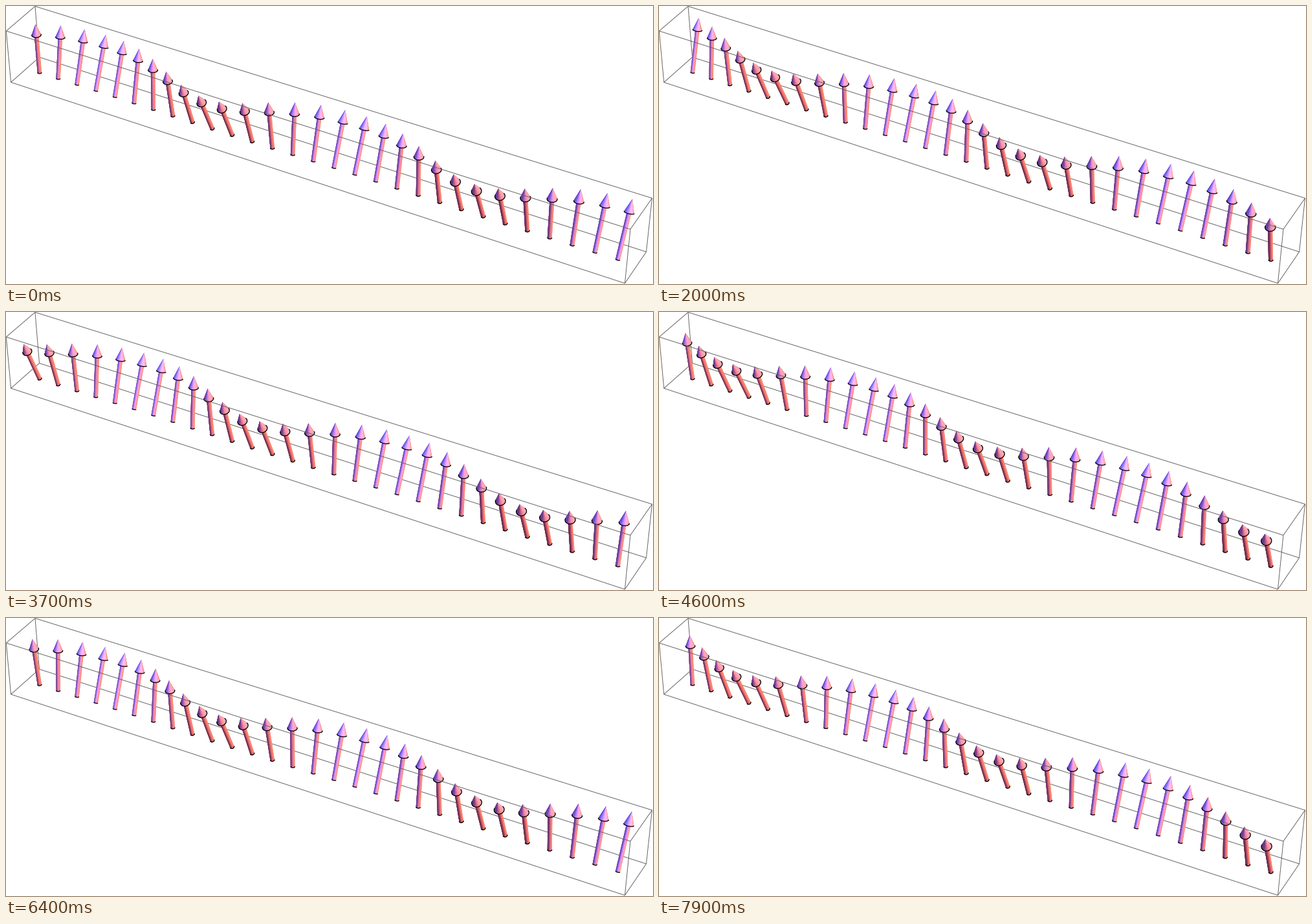
Write a matplotlib script that moves like this. It is 1000 px wide and 431 px high and loops after 8000 ms.

```python
import itertools
import numpy as np
import matplotlib.pyplot as plt
from matplotlib.animation import FuncAnimation
from matplotlib.collections import LineCollection, PolyCollection

W, H, DPI = 1000, 431, 64
FRAMES, STEP_MS = 80, 100
PX = 72 / DPI  # one pixel in points

# Camera: lengths are fractions of the box length
EYE = np.array([1.3, -2.4, 2.0])
DIST = np.linalg.norm(EYE)
TOWARD = EYE / DIST
RIGHT = np.cross([0, 0, 1], TOWARD)
RIGHT /= np.linalg.norm(RIGHT)
UP = np.cross(TOWARD, RIGHT)
VIEW = np.array([RIGHT, UP, TOWARD])
SCALE, CX, CY = 1078.3, 474.9, 203.0

# Box half sizes and arrow dimensions
BOX = np.array([0.5, 0.0385, 0.0468])
COUNT, HALF_ROW, FLOOR = 29, 0.4735, -0.0433
LENGTH, SWING = 0.088, 0.0358
HEAD, HEAD_R, TUBE_R = 0.0192, 0.0070, 0.0031

# Lights in view space: direction, colour
AMBIENT = np.array([0.38, 0.17, 0.23])
LIGHTS = [
    ((1.5, -0.5, 1.5), (0.58, 0.20, 0.08)),
    ((1.5, 1.5, 2.5), (0.18, 0.32, 0.20)),
    ((-0.5, 1.5, 1.5), (0.05, 0.18, 0.80)),
    ((-0.5, -0.5, 1.5), (0.00, 0.00, 0.11)),
]


def unit(v):
    return np.asarray(v) / np.linalg.norm(v)


def project(p):
    q = np.asarray(p) @ VIEW.T
    s = SCALE * DIST / (DIST - q[..., 2])
    return np.stack([CX + q[..., 0] * s, CY - q[..., 1] * s], axis=-1)


def shade(normals):
    n = normals @ VIEW.T
    rgb = np.tile(AMBIENT, (len(n), 1))
    for direction, color in LIGHTS:
        rgb += np.clip(n @ unit(direction), 0, None)[:, None] * np.array(color)
    return np.clip(rgb, 0, 1)


def arrow(i, frame):
    """Return polygons, their colours and the two rim lines of one arrow."""
    base = np.array([HALF_ROW * (2 * i / (COUNT - 1) - 1), 0, FLOOR])
    y = SWING * np.sin(0.5 * i - 0.2 * frame)
    axis = np.array([0, y, np.sqrt(LENGTH**2 - y**2)]) / LENGTH
    tip = base + LENGTH * axis
    neck = tip - HEAD * axis

    sight = unit(EYE - neck)
    side = unit(np.cross(axis, sight))
    front = np.cross(side, axis)

    def around(t):
        return np.cos(t)[:, None] * side + np.sin(t)[:, None] * front

    # Each polygon reaches to the far edge and the next covers it: no seams
    t = np.linspace(0, np.pi, 9)
    rim = TUBE_R * around(t)
    low, high = project(base + rim), project(neck + rim)
    polys = [np.vstack([low[k:], high[k:][::-1]]) for k in range(len(t) - 1)]
    tube_rgb = shade(around((t[:-1] + t[1:]) / 2))

    # Visible part of the cone, up to its tangent lines
    c = axis @ sight
    extra = np.arcsin(HEAD_R * c / (HEAD * np.sqrt(1 - c * c)))
    t = np.linspace(-extra, np.pi + extra, 19)
    edge = project(neck + HEAD_R * around(t))
    top = project(tip)
    polys += [np.vstack([edge[k:], top]) for k in range(len(t) - 1)]
    slant = np.hypot(HEAD, HEAD_R)
    normals = (HEAD * around((t[:-1] + t[1:]) / 2) + HEAD_R * axis) / slant
    return polys, np.vstack([tube_rgb, shade(normals)]), [low, edge]


def box_edges():
    """Split the box edges into those behind and in front of the arrows."""
    behind, ahead = [], []
    corners = list(itertools.product((-1, 1), repeat=3))
    for a, b in itertools.combinations(corners, 2):
        if sum(p != q for p, q in zip(a, b)) == 1:
            hidden = (-1, 1, -1) in (a, b)
            line = project(np.array([a, b]) * BOX)
            (behind if hidden else ahead).append(line)
    return behind, ahead


fig = plt.figure(figsize=(W / DPI, H / DPI), dpi=DPI, facecolor="white")
ax = fig.add_axes([0, 0, 1, 1])
ax.set_xlim(0, W)
ax.set_ylim(H, 0)
ax.axis("off")

for lines, z in zip(box_edges(), (1, 4)):
    ax.add_collection(LineCollection(lines, colors="#606060",
                                     linewidths=0.95 * PX, zorder=z))
solids = PolyCollection([], linewidths=0, zorder=2)
rims = LineCollection([], colors="black", linewidths=1.3 * PX, zorder=3)
ax.add_collection(solids)
ax.add_collection(rims)


def draw(frame):
    polys, colors, lines = [], [], []
    for i in range(COUNT):
        p, c, r = arrow(i, frame)
        polys += p
        colors.append(c)
        lines += r
    solids.set_verts(polys)
    solids.set_facecolor(np.vstack(colors))
    rims.set_segments(lines)
    return solids, rims


anim = FuncAnimation(fig, draw, frames=FRAMES, interval=STEP_MS,
                     repeat=True, repeat_delay=0)
plt.show()
```
